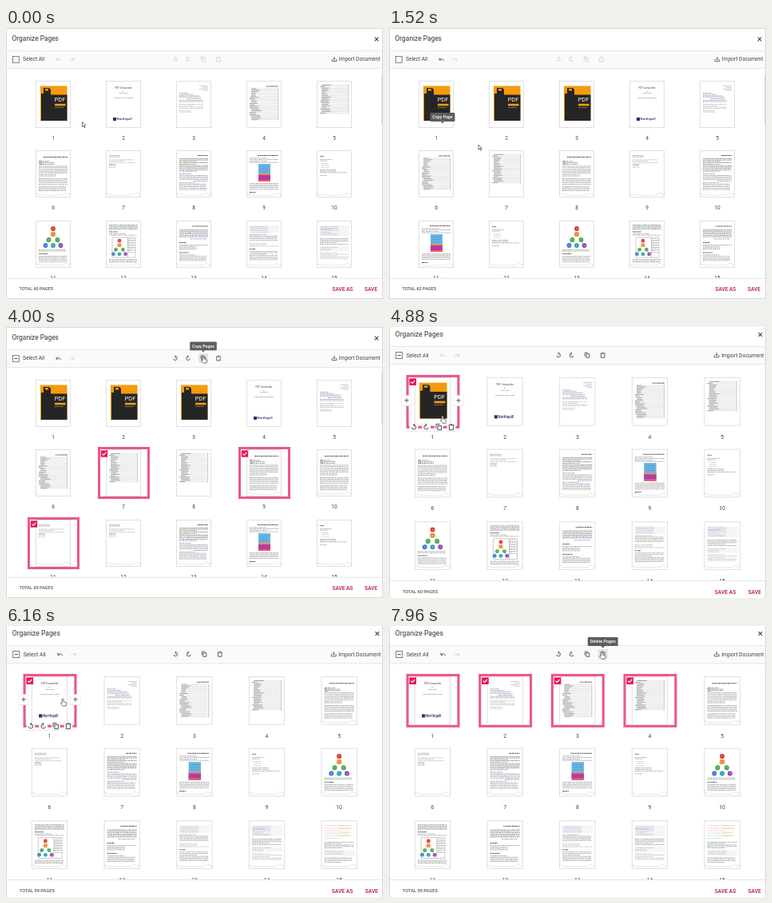
Recreate the animation shown at these times as an HTML page with a canvas. Size 472 by 339 pixels, loop 8 s.

```html
<!DOCTYPE html>
<html lang="en">
<head>
<meta charset="utf-8">
<title>Organize Pages</title>
<style>
  html, body { margin: 0; width: 472px; height: 339px; overflow: hidden; background: #fff; }
  canvas { display: block; }
</style>
</head>
<body>
<canvas id="stage" width="472" height="339"></canvas>
<script>
const ctx = document.getElementById('stage').getContext('2d');
const LOOP = 8000, CUT = 4560;
const PINK = '#e3165b', INK = '#444', FAINT = '#cfcfcf', ORANGE = '#f59a0c';
const TEXT = '#999', DARK = '#7c7c7c', PALE = '#b8b8b8', LINK = '#8585e2';

const ICONS = {
  undo: 'M-3-2v2.6h2.6M-2.8.4Q0-2.8 3 1.6',
  redo: 'M3-2v2.6h-2.6M2.8.4Q0-2.8-3 1.6',
  left: 'M-.4-2.2A2.4 2.4 0 1 1-2.4.6M1-3.5L-.4-2.2 1-.9M-.4.2h.9',
  right: 'M.4-2.2A2.4 2.4 0 1 0 2.4.6M-1-3.5L.4-2.2-1-.9M-.4.2h.9',
  copy: 'M-1.2-1.4h3.8v4.4h-3.8zM-2.8 1.4v-4.4h3.8',
  trash: 'M-2.2-1.6v4.6h4.4v-4.6M-3-2h6M-1-2.9h2',
  load: 'M-2.8 0v2.6h5.6v-2.6M0-3v3.6M-1.5-.8L0 .6 1.5-.8',
  close: 'M-2.3-2.3l4.6 4.6M2.3-2.3l-4.6 4.6',
  plus: 'M-2.6 0h5.2M0-2.6v5.2',
  check: 'M-2.4 0l1.7 1.8 3.2-3.6',
  minus: 'M-2 0h4'
};
for (const name in ICONS) ICONS[name] = new Path2D(ICONS[name]);
const ARROW = new Path2D('M0 0v6.2l1.5-1.3 1.1 2.4.9-.4-1.1-2.3h2z');
const HAND = new Path2D('M-.9 1a.9.9 0 0 1 1.8 0v2.8l2.9.9q1 .4.8 1.4l-.8 3h-3.7l-2.5-3.1q-.3-1.2 1.5-.6z');
const WAVE = new Path2D('M0 52.5Q5 55 9 55H32Q36 55 37.5 52L44 55');

const run = (from, n) => Array.from({ length: n }, (_, i) => from + i);
const twice = [1, 1, ...run(1, 13)];
const copied = [1, 1, 1, 2, 3, 4, 5, 5, 6, 6, 7, 7, 8, 9, 10];

// time, total, visible pages, selected positions
const states = [
  [0, 60, run(1, 15), []],
  [720, 61, [1, ...run(1, 14)], []],
  [1240, 62, twice, []],
  [2000, 62, twice, [6]],
  [2480, 62, twice, [6, 7]],
  [2880, 62, twice, [6, 7, 8]],
  [3760, 65, copied, [6, 8, 10]],
  [CUT, 60, run(1, 15), []],
  [4760, 60, run(1, 15), [0]],
  [5480, 59, run(2, 15), []],
  [6040, 59, run(2, 15), [0]],
  [6440, 59, run(2, 15), [0, 1]],
  [6880, 59, run(2, 15), [0, 1, 2]],
  [7240, 59, run(2, 15), [0, 1, 2, 3]]
];

// pointer stops: time, x, y
const route = [
  [80, 95.5, 117.5], [320, 67, 123], [1360, 67, 123], [1520, 112, 146], [1840, 147, 177],
  [2160, 150, 177], [2400, 235, 177], [2560, 237, 177], [2800, 311, 174], [3120, 311, 174],
  [3480, 247, 36], [4559, 247, 36],
  [CUT, 103, 131], [4720, 66, 102], [4880, 71.1, 112.6], [5160, 81.8, 123], [5560, 81.8, 123],
  [5960, 75, 93], [6160, 75, 93], [6400, 151.7, 93], [6560, 151.7, 93], [6840, 243.9, 92],
  [6960, 243.9, 92], [7200, 323.5, 94], [7360, 323.5, 94], [7680, 264.5, 36]
];

// from, to, text, x, y
const tips = [
  [480, 1640, 'Copy Page', 67, 111.5],
  [3560, CUT, 'Copy Pages', 247, 23.8],
  [5240, 5520, 'Delete Page', 82, 111.5],
  [7760, LOOP, 'Delete Pages', 266, 23.8]
];

let seed = 1;
function rand() {
  seed = (seed * 16807) % 2147483647;
  return seed / 2147483647;
}

function box(x, y, w, h, color) {
  ctx.fillStyle = color;
  ctx.fillRect(x, y, w, h);
}

function label(text, x, y, size, color = INK, align = 'left', weight = 400) {
  ctx.font = `${weight} ${size}px Roboto, sans-serif`;
  ctx.textAlign = align;
  ctx.textBaseline = 'middle';
  ctx.fillStyle = color;
  ctx.fillText(text, x, y);
}

function icon(name, x, y, color = INK, scale = 1, weight = 0.8) {
  ctx.save();
  ctx.translate(x, y);
  ctx.scale(scale, scale);
  ctx.strokeStyle = color;
  ctx.lineWidth = weight;
  ctx.stroke(ICONS[name]);
  ctx.restore();
}

function dot(x, y, r, color) {
  ctx.fillStyle = color;
  ctx.beginPath();
  ctx.arc(x, y, r, 0, 7);
  ctx.fill();
}

function lines(x, y, n, w, color = TEXT, step = 1.75, thick = 0.75) {
  for (let i = 0; i < n; i++) {
    const end = x + w * (rand() < 0.22 ? 0.6 : 1);
    for (let px = x; px < end;) {
      const len = 0.8 + rand() * 2.2;
      box(px, y + i * step, Math.min(len, end - px), thick, color);
      px += len + 0.6;
    }
  }
}

const heading = (x, y, w) => lines(x, y, 1, w, '#555', 0, 1);

function contents(y, n) {
  for (let i = 0; i < n; i++) {
    const inset = rand() < 0.3 ? 0 : 2, w = 5 + rand() * 8, top = y + i * 1.85;
    box(4 + inset, top, w, 0.8, '#888');
    box(4 + inset + w, top + 0.3, 34 - inset - w, 0.4, PALE);
    box(38.8, top, 1.2, 0.8, '#888');
  }
}

function tree(cx, y, s) {
  const nodes = [[0, 0, '#e5352d'], [0, 7, '#ee8a28'], [-5.5, 14, '#4aa84e'], [5.5, 14, '#4aa84e'],
    [-9.5, 21, '#3b7fd0'], [0, 21, '#2f9fb0'], [9.5, 21, '#8d4bb5']];
  ctx.strokeStyle = PALE;
  ctx.lineWidth = 0.5;
  ctx.beginPath();
  for (const side of [-1, 1]) {
    ctx.moveTo(cx, y);
    ctx.lineTo(cx + side * 9.5 * s, y + 21 * s);
    ctx.lineTo(cx, y + 7 * s);
  }
  ctx.stroke();
  for (const [dx, dy, color] of nodes) {
    dot(cx + dx * s, y + dy * s, 2.9 * s, color);
    box(cx + (dx - 1) * s, y + (dy - 0.4) * s, 2 * s, 0.8 * s, 'rgba(255,255,255,.6)');
  }
}

function codeBlock(y, h) {
  box(3, y, 38, h, '#f5f5f7');
  lines(5, y + 1, Math.floor(h / 1.8), 22, '#bdbdd0');
}

const paper = {
  1() {
    box(6, 5.5, 33.5, 43.5, ORANGE);
    ctx.fillStyle = '#252525';
    ctx.beginPath();
    ctx.moveTo(7, 15);
    ctx.lineTo(10, 15);
    ctx.lineTo(10, 8);
    ctx.lineTo(17, 8);
    ctx.lineTo(19, 10);
    ctx.lineTo(19, 16.5);
    ctx.lineTo(39.5, 16.5);
    ctx.lineTo(39.5, 49);
    ctx.lineTo(7, 49);
    ctx.fill();
    box(12, 9, 4, 2.5, ORANGE);
    label('PDF', 30.5, 22.8, 7.4, '#fff', 'center');
    box(24, 27.8, 13.5, 2.6, ORANGE);
    box(24, 32, 11, 0.7, '#888');
  },
  2() {
    label('PDF Compendia', 22, 8, 2.9, '#444', 'center');
    label('By', 22, 12, 1.9, '#555', 'center');
    label('Owen Harker', 22, 14.7, 1.9, '#555', 'center');
    label('Foreword by Simon Castell', 22, 20.5, 2, '#555', 'center');
    box(9, 45, 4, 4, '#26306f');
    label('Northquill', 13.6, 47.2, 4.3, '#26306f', 'left', 500);
  },
  3() {
    for (let i = 0; i < 4; i++) box(29 + i % 2 * 4, 5 + i * 1.9, 11 - i % 2 * 4, 0.7, PALE);
    lines(4, 14, 2, 18);
    lines(4, 17.6, 1, 25, LINK);
    lines(4, 19.4, 1, 27);
    lines(14, 21.2, 1, 17, LINK);
    lines(4, 23, 2, 30);
    lines(4, 28, 4, 30, PALE);
    lines(4, 36, 2, 15, PALE);
  },
  4() { heading(25, 5.5, 15); contents(8.5, 22); },
  5() { contents(4, 20); },
  6() {
    heading(10, 7, 30);
    label('S', 4, 15, 7, '#333');
    lines(8.5, 12.5, 3, 15, DARK);
    lines(4, 18.5, 8, 36);
    lines(4, 34, 5, 36);
    lines(4, 44, 4, 34);
  },
  7() {
    lines(4, 5, 2, 14);
    lines(4, 10.5, 3, 32, PALE);
    lines(4, 16, 2, 14, LINK);
    lines(4, 20, 1, 9, PALE);
  },
  8() {
    heading(27, 5, 13);
    lines(4, 9, 10, 36, DARK);
    lines(4, 28, 1, 15, LINK);
    lines(4, 30, 4, 36);
    lines(22, 37, 1, 18, LINK);
    lines(4, 39, 6, 34);
  },
  9() {
    heading(14, 5, 26);
    lines(4, 8.5, 4, 36);
    box(15, 16, 15, 22, '#68b5e5');
    box(15, 28, 15, 2, '#f08a52');
    box(15, 30, 15, 6, '#b43ca2');
    box(15, 36, 15, 2, '#f05d5d');
    lines(17, 19, 3, 11, '#4c8fbd', 3);
    lines(4, 40, 5, 36);
    heading(4, 51, 8);
  },
  10() {
    heading(4, 6, 5);
    lines(4, 10, 2, 15);
    lines(6, 15, 3, 9, PALE, 2.4);
    lines(4, 23, 3, 34);
    lines(4, 30, 1, 9);
  },
  11() {
    tree(22, 9, 1);
    lines(4, 35, 2, 34);
    heading(4, 40, 12);
    lines(4, 43, 5, 35);
  },
  12() {
    lines(4, 4, 4, 36, DARK);
    heading(4, 12.5, 11);
    lines(4, 15, 2, 35);
    ctx.strokeStyle = TEXT;
    ctx.lineWidth = 0.5;
    ctx.strokeRect(8, 20, 29, 25);
    tree(17, 24, 0.8);
    box(27, 20, 0.5, 25, TEXT);
    for (let i = 0; i < 6; i++) box(27, 23 + i * 3, 10, 0.5, TEXT);
    lines(28, 21, 6, 7, PALE, 3);
    lines(4, 47, 3, 35);
  },
  13() {
    heading(20, 5.5, 20);
    lines(4, 10, 6, 36, DARK);
    lines(18, 21.5, 1, 20, LINK);
    heading(4, 26, 9);
    lines(4, 29, 4, 36);
    heading(4, 38.5, 12);
    lines(4, 41.5, 5, 34);
  },
  14() {
    codeBlock(5, 9);
    lines(4, 16, 5, 35);
    lines(4, 27, 3, 36, PALE);
    heading(4, 34, 7);
    lines(4, 37, 7, 35);
  },
  15() {
    codeBlock(5, 13);
    lines(5, 9, 1, 15, '#a9a9e6');
    lines(4, 21, 5, 36);
    codeBlock(31, 6);
    lines(4, 39, 5, 36, PALE);
  },
  16() {
    lines(4, 5, 3, 33, '#ebb0b0', 3);
    lines(4, 14, 3, 30, '#b3d6ba', 3);
    lines(22, 5, 4, 15, '#e3cd9c', 4);
    lines(4, 25, 5, 36);
    codeBlock(35, 7);
    lines(4, 44, 4, 34);
  }
};

function thumbnail(id) {
  seed = id * 7919 + 13;
  ctx.strokeStyle = '#e0e0e0';
  ctx.lineWidth = 1;
  ctx.strokeRect(0.5, -0.5, 43, 58);
  paper[id]();
  if (id > 5) {
    ctx.strokeStyle = '#ccc';
    ctx.lineWidth = 0.5;
    ctx.stroke(WAVE);
  }
}

function chip(name, x, y, size, scale) {
  box(x - size / 2 - 0.5, y - size / 2, size + 1, size + 1, '#e6e6e6');
  box(x - size / 2, y - size / 2, size, size, '#fff');
  icon(name, x, y, INK, scale);
}

function tick(x, y, on) {
  box(x - 4.2, y - 4.2, 8.4, 8.4, on ? PINK : '#777');
  if (on) icon('check', x, y, '#fff', 1, 1.1);
  else box(x - 3.5, y - 3.5, 7, 7, '#fff');
}

const cell = i => [37 + 88 * (i % 5), Math.floor(67 + 87.5 * Math.floor(i / 5))];

function card(i, id, on, hover, alone) {
  const [x, y] = cell(i);
  ctx.save();
  ctx.translate(x, y);
  if (on || hover) {
    ctx.strokeStyle = on ? '#e8588a' : '#e4e4e4';
    ctx.lineWidth = 3;
    ctx.strokeRect(-8.5, -2.5, 62, 62);
  }
  thumbnail(id);
  if (on || hover) tick(-2, 4.5, on);
  if (hover) {
    chip('plus', -9.5, 27, 12, 1);
    chip('plus', 53.5, 27, 12, 1);
    if (alone) ['left', 'right', 'copy', 'trash'].forEach((name, n) => chip(name, -0.8 + n * 15.2, 59.3, 9.6, 1.15));
  }
  label(i + 1, 22, 71.5, 6.6, INK, 'center');
  ctx.restore();
}

function pointerAt(t) {
  let n = route.findIndex(stop => stop[0] > t);
  if (n < 0) n = route.length;
  if (n === 0) return route[0].slice(1);
  const [t0, x0, y0] = route[n - 1];
  const [t1, x1, y1] = route[n] || [LOOP, x0, y0];
  const p = (t - t0) / (t1 - t0), e = p * p * (3 - 2 * p);
  return [x0 + (x1 - x0) * e, y0 + (y1 - y0) * e];
}

function tooltip(text, x, y) {
  ctx.font = '500 5.3px Roboto, sans-serif';
  const w = ctx.measureText(text).width + 5.5;
  ctx.fillStyle = '#5d5d5d';
  ctx.beginPath();
  ctx.roundRect(x - w / 2, y - 5.4, w, 10.8, 1);
  ctx.moveTo(x - 2.5, y + 5.3);
  ctx.lineTo(x, y + 7.8);
  ctx.lineTo(x + 2.5, y + 5.3);
  ctx.fill();
  label(text, x, y + 0.2, 5.3, '#fff', 'center', 500);
}

function draw(clock) {
  const late = clock >= CUT;
  const t = late ? Math.floor(clock / 40) * 40 : Math.floor(clock / 80) * 80;
  const zoom = late ? 1.03 : 1, shift = late ? -5 : 0;
  const view = anchor => ctx.setTransform(zoom, 0, 0, zoom, anchor * (1 - zoom), shift);
  const [, total, pages, picked] = states.filter(s => s[0] <= t).pop();
  const [px, py] = pointerAt(t);
  const active = picked.length > 0, edited = total !== 60;
  const tools = [['left', 212], ['right', 228], ['copy', 247], ['trash', 266]];

  ctx.setTransform(1, 0, 0, 1, 0, 0);
  box(0, 0, 472, 339, '#fff');

  view(208);
  ctx.save();
  ctx.beginPath();
  ctx.rect(0, 50, 480, 263);
  ctx.clip();
  const hovered = pages.findIndex((_, i) => {
    const [x, y] = cell(i);
    return px > x - 10.5 && px < x + 54.5 && py > y - 4 && py < y + 64;
  });
  pages.forEach((id, i) => card(i, id, picked.includes(i), i === hovered, picked.length < 2));
  ctx.restore();

  box(-10, 28, 500, 22.5, '#fafafa');
  box(-10, 28, 500, 0.8, '#e2e2e2');
  box(-10, 50, 500, 0.8, '#e2e2e2');
  box(-10, 312.8, 500, 0.8, '#dedede');

  const onTool = active && py > 33 && py < 46 ? tools.find(([, x]) => Math.abs(px - x) < 6) : null;
  if (onTool) box(onTool[1] - 6, 33, 12, 12, '#e3e3e3');
  for (const [name, x] of tools) icon(name, x, 39, active ? INK : FAINT);

  view(0);
  label('Organize Pages', 7.6, 14, 8.4, '#333');
  ctx.strokeStyle = '#666';
  ctx.lineWidth = 0.8;
  ctx.strokeRect(8.5, 35.5, 7.8, 7.8);
  if (active) icon('minus', 12.4, 39.4, INK, 1, 0.9);
  label('Select All', 21, 39.5, 6.6);
  icon('undo', 66, 39.5, edited ? INK : FAINT);
  icon('redo', 82, 39.5, FAINT);
  label(`TOTAL ${total} PAGES`, 16.4, 326.3, 5.55, '#555', 'left', 500);

  view(437);
  icon('close', 464, 14, INK, 1, 1.1);
  icon('load', 411, 39);
  label('Import Document', 468.3, 39.5, 6.6, INK, 'right');
  label('SAVE AS', 434.3, 327.2, 6.5, '#b5163f', 'right', 500);
  label('SAVE', 465, 327.2, 6.5, '#b5163f', 'right', 500);

  ctx.setTransform(1, 0, 0, 1, 0, 0);
  box(0, 0, 1, 339, '#d8d8d8');
  box(471, 0, 1, 339, '#d8d8d8');
  if (!late) {
    box(0, 0, 472, 1, '#d8d8d8');
    box(0, 338, 472, 1, '#d8d8d8');
    box(470, 58, 2, 63, '#d8d8d8');
  }

  view(208);
  for (const [from, to, text, x, y] of tips) if (t >= from && t < to) tooltip(text, x, y);
  const pointer = hovered >= 0 || onTool ? HAND : ARROW;
  ctx.translate(px, py);
  ctx.fillStyle = '#fff';
  ctx.strokeStyle = '#444';
  ctx.lineWidth = 0.7;
  ctx.fill(pointer);
  ctx.stroke(pointer);
}

const begin = performance.now();
function tickFrame() {
  draw((performance.now() - begin) % LOOP);
  requestAnimationFrame(tickFrame);
}
tickFrame();
</script>
</body>
</html>
```
